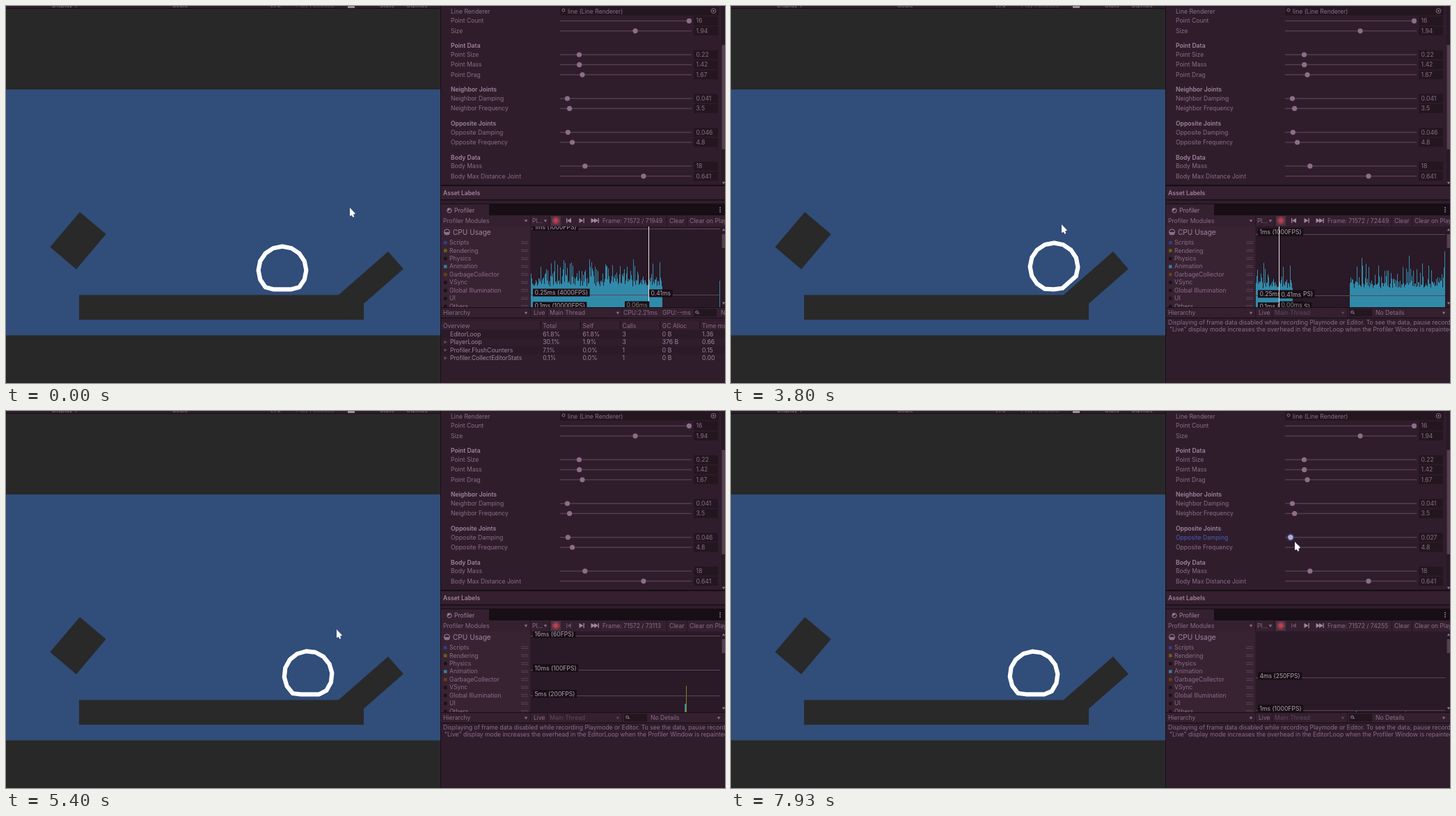
An HTML page with a canvas for the animation above (8000 ms loop, 1033 by 542 pixels).

```html
<!DOCTYPE html>
<html lang="en">
<head>
<meta charset="utf-8">
<title>Soft body editor</title>
<style>
html, body { margin: 0; width: 100%; height: 100%; overflow: hidden; background: #282828; }
canvas { display: block; }
</style>
</head>
<body>
<canvas id="stage" width="1033" height="542"></canvas>
<script>
const ctx = document.getElementById('stage').getContext('2d');
const LOOP = 8000, RESUME = 2270, LAUNCH = 4200, LAND = 4880, FOCUS = 7400;
const PANEL = '#2f1d2c', BAR = '#34202f', DARK = '#24161f', EDGE = '#180e15';
const TEXT = '#8d6d8a', BRIGHT = '#a184a0', DIM = '#5f485b', TEAL = '#318aa9';
const CHART = { left: 754, right: 1026, top: 317, bottom: 433, zero: 446, perFrame: 0.272 };
const MARKED = 71572, PAUSED = 71949, SPIKE = 72935;

const clamp01 = u => Math.min(Math.max(u, 0), 1);
const smooth = u => (u = clamp01(u), u * u * (3 - 2 * u));
function hash(n) {
  const s = Math.sin(n * 12.9898) * 43758.5453;
  return s - Math.floor(s);
}

// Motion
function frameCount(t) {
  const keys = [[2200, PAUSED], [2870, 72232], [3800, 72449], [4800, 72872], [6330, 73486], [7930, 74255]];
  return Math.round(keys.slice(1).reduce((n, [end, count], i) => {
    const [start, before] = keys[i];
    return n + (count - before) * clamp01((t - start) / (end - start));
  }, PAUSED));
}
function cursorAt(t) {
  const moves = [[1000, 1130, 473, 307], [1400, 1670, 362, -20], [2300, 2600, 475, 314],
    [5700, 6200, 795, 233], [6530, 6900, 808, 180], [7730, 7930, 810, 188]];
  return moves.reduce(([x, y], [start, end, toX, toY]) => {
    const u = smooth((t - start) / (end - start));
    return [x + (toX - x) * u, y + (toY - y) * u];
  }, [494, 290]);
}
function blobAt(t) {
  if (t < LAUNCH) {
    const s = Math.min(Math.max(t - RESUME, 0) / 1000, 1.6);
    const x = 397 + 18.4 * s + 16.6 * s * s;
    return [x, 380 - 5 * smooth((x - 450) / 14)];
  }
  const s = (t - LAUNCH) / 1000, u = (t - LAND) / 1000;
  const x = 435 + 34 * Math.exp(-2.43 * s) * Math.cos(3.5 * s);
  const y = u < 0 ? 336 + 340 * (u + 0.34) ** 2 : 380 - 5 * Math.exp(-4 * u) * Math.cos(14 * u);
  return [x, y];
}
function chartScale(t, frame) {
  if (frame < SPIKE) return 126 - 0.0083 * Math.max(0, t - 2870);
  return frame < SPIKE + 1000 ? 7.38 : 15.67;
}

// Drawing helpers
function rect(x, y, w, h, color) {
  ctx.fillStyle = color;
  ctx.fillRect(x, y, w, h);
}
function path(points) {
  ctx.beginPath();
  points.forEach(p => ctx.lineTo(...p));
  ctx.closePath();
}
function poly(points, color) {
  path(points);
  ctx.fillStyle = color;
  ctx.fill();
}
function tilted(x, y, w, h, degrees, color) {
  ctx.save();
  ctx.translate(x, y);
  ctx.rotate(degrees * Math.PI / 180);
  rect(-w / 2, -h / 2, w, h, color);
  ctx.restore();
}
function disc(x, y, r, color) {
  ctx.beginPath();
  ctx.arc(x, y, r, 0, 7);
  ctx.fillStyle = color;
  ctx.fill();
}
function ring(x, y, r, color) {
  ctx.beginPath();
  ctx.arc(x, y, r, 0, 7);
  ctx.strokeStyle = color;
  ctx.lineWidth = 1;
  ctx.stroke();
}
function text(s, x, y, color = TEXT, weight = 400, size = 8.6) {
  ctx.font = `${weight} ${size}px Inter, sans-serif`;
  ctx.fillStyle = color;
  ctx.fillText(s, x, y + size * 0.36);
}
const bold = (s, x, y) => text(s, x, y, BRIGHT, 600);
const triangle = (x, y, r, angle, color = TEXT) =>
  poly([0, 2.1, 4.2].map(a => [x + r * Math.cos(a + angle), y + r * Math.sin(a + angle)]), color);
const arrow = (x, y, color) => triangle(x, y, 2.6, Math.PI / 2, color);
function clipped(x, y, w, h, draw) {
  ctx.save();
  ctx.beginPath();
  ctx.rect(x, y, w, h);
  ctx.clip();
  draw();
  ctx.restore();
}

function drawBlob(t) {
  const [x, y] = blobAt(t), floor = 407.3, reach = 9;
  const slope = -41.2 * Math.PI / 180, nx = Math.sin(slope), ny = -Math.cos(slope);
  path(Array.from({ length: 16 }, (_, i) => {
    const a = (x - 397) / 34 + i * Math.PI / 8;
    const px = x + 34.4 * Math.cos(a), py = Math.min(y + 34.4 * Math.sin(a), floor);
    const push = Math.max(0, reach - (px - 478) * nx - (py - 416) * ny);
    return [px + nx * push, py + ny * push];
  }));
  ctx.strokeStyle = '#fff';
  ctx.lineWidth = 6.2;
  ctx.lineJoin = 'round';
  ctx.stroke();
}

function drawGame(t) {
  rect(0, 0, 624, 542, '#282828');
  rect(0, 0, 624, 3, PANEL);
  rect(0, 3, 624, 1, EDGE);
  clipped(0, 0, 624, 3, () => {
    text('Display 1', 66, -1.5);
    text('Scale', 239, -1.5);
    text('1.7x', 379, -1.5);
    text('Play Focused', 417, -1.5, DIM);
    rect(491, 0, 10, 3, BRIGHT);
    text('Stats', 537, -1.5);
    text('Gizmos', 575, -1.5);
  });
  rect(0, 120, 624, 353.5, '#314d79');
  tilted(103.5, 337.3, 49.3, 66, 40.3, '#292929');
  rect(105, 415.5, 409, 35.5, '#292929');
  tilted(518.6, 401.7, 110, 33.3, -41.2, '#292929');
  drawBlob(t);
}

function slider(label, y, value, max, focused) {
  const knob = 799 + 182.5 * value / max;
  text(label, 639, y, focused ? '#4c5cba' : TEXT);
  rect(796, y - 0.7, 189, 1.4, '#56404f');
  if (focused) disc(knob, y, 5.5, '#2d3f82');
  disc(knob, y, 3.6, focused ? '#c0adbd' : TEXT);
  rect(988, y - 6.5, 35, 13, DARK);
  text(value, 991.5, y);
}

function drawInspector(t) {
  rect(624, 0, 409, 542, PANEL);
  text('Line Renderer', 639, 7.5);
  rect(796, 1, 228, 12.5, DARK);
  ring(801, 6, 2, TEXT);
  text('line (Line Renderer)', 807, 7.5);
  ring(1016.5, 7, 3.4, TEXT);
  disc(1016.5, 7, 1.3, TEXT);
  const damping = (0.046 - 0.019 * clamp01((t - FOCUS) / 330)).toFixed(3);
  const groups = {
    '': [['Point Count', '16', 16], ['Size', '1.94', 3.37]],
    'Point Data': [['Point Size', '0.22', 1.64], ['Point Mass', '1.42', 10.5], ['Point Drag', '1.67', 10.5]],
    'Neighbor Joints': [['Neighbor Damping', '0.041', 1], ['Neighbor Frequency', '3.5', 60]],
    'Opposite Joints': [['Opposite Damping', damping, 1, t >= FOCUS], ['Opposite Frequency', '4.8', 60]],
    'Body Data': [['Body Mass', '18', 100], ['Body Max Distance Joint', '0.641', 1]]
  };
  let y = -12.8;
  for (const [title, rows] of Object.entries(groups)) {
    bold(title, 639, y += 21.5);
    rows.forEach(([label, value, max, focused], i) => {
      y += i ? 14.4 : 12.7;
      slider(label, y, value, max, focused);
    });
  }
  rect(1028, 0, 5, 258, '#291a25');
  rect(1028.5, 56, 4.5, 150, '#553f50');
  arrow(1031, 254);
  rect(625, 257, 408, 2, EDGE);
  rect(625, 259, 408, 19, BAR);
  bold('Asset Labels', 628, 268.5);
  rect(625, 278, 408, 1.5, EDGE);
}

function chartLabel(s, x, y, color = '#b6a6b4') {
  ctx.font = '400 8.6px Inter, sans-serif';
  rect(x, y - 5.5, ctx.measureText(s).width + 5, 11, EDGE);
  text(s, x + 2.5, y, color);
}

function drawChart(t, frame) {
  const { left, right, top, bottom, zero, perFrame } = CHART;
  const width = right - left, height = bottom - top, scale = chartScale(t, frame);
  const toX = n => Math.floor(right - (frame - n) * perFrame);
  const toY = ms => zero - ms * scale;
  rect(left, top, 279, height, '#2a1926');
  clipped(left, top, width, height, () => {
    for (let x = left; x < right; x++) {
      const n = frame - (right - 1 - x) / perFrame, k = Math.round(n * perFrame);
      if (n > PAUSED - 305 && n < PAUSED) continue;
      const tall = hash(k + 7000) > 0.982 ? 0.35 : 0;
      const ms = 0.34 + 0.07 * hash(k + 300) + 0.26 * hash(k) ** 3 + tall;
      rect(x, toY(ms), 1, ms * scale, TEAL);
    }
    if (frame >= SPIKE) {
      const x = toX(SPIKE);
      rect(x - 2, toY(3.4), 3, height, TEAL);
      rect(x - 1, toY(2.4), 2, height, '#8a8424');
      rect(x, toY(6.9), 1, height, '#8a8424');
    }
    const rates = scale > 50 ? [1000, 4000, 10000] : scale > 10 ? [250, 1000] : [60, 100, 200];
    for (const fps of rates) {
      const y = toY(1000 / fps);
      rect(left, Math.round(y), width, 1, '#5c4857');
      chartLabel(`${Math.floor(100000 / fps) / 100 | 0 || 1000 / fps}ms (${fps}FPS)`, 757, y - 2.5);
    }
    const x = toX(MARKED);
    if (x > left) {
      const low = x < 800;
      rect(x, top, 1, height, '#e6e0e4');
      chartLabel('0.41ms', x + 1, toY(0.25) - 1.5);
      chartLabel(low ? '0.00ms' : '0.06ms', low ? x + 1 : x - 34, 430, '#82877a');
    }
  });
  rect(1028.5, 328, 4.5, 20, '#553f50');
  triangle(1031, 322, 2.6, -Math.PI / 2);
  arrow(1031, 427);
}

function drawModules() {
  rect(625, 317, 128, 116, '#382333');
  ring(633.5, 325, 4, BRIGHT);
  rect(630, 325, 7, 4, TEXT);
  text('CPU Usage', 642, 325, BRIGHT, 400, 10.1);
  const names = ['Scripts', 'Rendering', 'Physics', 'Animation', 'GarbageCollector', 'VSync',
    'Global Illumination', 'UI', 'Others'];
  const colors = { Scripts: '#343f85', Rendering: '#67601c', Animation: '#34809a', GarbageCollector: '#654019' };
  clipped(625, 317, 128, 116, () => names.forEach((name, i) => {
    const y = 340 + i * 11.45;
    rect(629, y - 2, 4.5, 4.5, colors[name] || '#1d1118');
    text(name, 637, y);
    for (const d of [-1.5, 1]) rect(740, y + d, 10, 0.8, DIM);
  }));
}

function searchBox(x) {
  rect(x, 435.5, 33, 11, DARK);
  ring(x + 4.5, 440, 1.8, BRIGHT);
  rect(x + 6, 441.5, 2, 1, BRIGHT);
}

function drawTable() {
  text('CPU:2.21ms', 887, 441);
  text('GPU:--ms', 943, 441);
  searchBox(988);
  text('No Details', 1027, 441);
  rect(625, 453, 408, 12, BAR);
  const rows = [
    'Overview|Total|Self|Calls|GC Alloc|Time ms',
    'EditorLoop|61.8%|61.8%|3|0 B|1.36',
    'PlayerLoop|30.1%|1.9%|3|376 B|0.66',
    'Profiler.FlushCounters|7.1%|0.0%|1|0 B|0.15',
    'Profiler.CollectEditorStats|0.1%|0.0%|1|0 B|0.00'];
  rows.forEach((row, i) => {
    const y = i ? 460.2 + i * 11.5 : 459.5;
    if (i % 2) rect(625, y - 5.7, 408, 11.5, '#2b1a28');
    row.split('|').forEach((s, j) => {
      const x = j ? 714 + 57.2 * j : i ? 638 : 628;
      text(s, x, y, i ? BRIGHT : TEXT);
      if (j && !i) rect(x - 3.5, 453, 1, 12, EDGE);
    });
    if (i > 1) triangle(631, y, 3, 0, DIM);
  });
}

function drawMessage() {
  searchBox(888);
  text('No Details', 926, 441);
  arrow(1024, 441);
  text('Displaying of frame data disabled while recording Playmode or Editor. To see the data, pause recording.', 628, 455);
  text('"Live" display mode increases the overhead in the EditorLoop when the Profiler Window is repainted.', 630, 465);
}

function drawProfiler(t) {
  const live = t >= RESUME, frame = frameCount(t);
  rect(625, 284, 408, 17, EDGE);
  rect(625, 285, 69, 16, BAR);
  ring(637, 294, 3.2, BRIGHT);
  triangle(636, 292.5, 2.6, 0, BRIGHT);
  text('Profiler', 644, 293.5, BRIGHT);
  for (const y of [290, 293, 296]) disc(1026, y, 0.9, BRIGHT);

  const y = 308.5, back = frame - MARKED > 1000 ? DIM : BRIGHT;
  rect(625, 301, 408, 16, BAR);
  text('Profiler Modules', 628, y);
  arrow(747, y);
  text('Pl...', 756, y);
  arrow(775, y);
  rect(783, 302, 14, 14, '#4c3444');
  ring(790, y, 4.6, '#c03e50');
  disc(790, y, 3.2, '#c03e50');
  rect(805, y - 3.5, 1.3, 7, back);
  triangle(810, y, 4, Math.PI, back);
  triangle(825.5, y, 4, 0, BRIGHT);
  rect(829.5, y - 3.5, 1.3, 7, BRIGHT);
  triangle(842.5, y, 4, 0, BRIGHT);
  triangle(847, y, 4, 0, BRIGHT);
  rect(850.5, y - 3.5, 1.3, 7, BRIGHT);
  text(`Frame: ${MARKED} / ${frame}`, 857, y);
  text('Clear', 953, y);
  text('Clear on Play', 982, y);
  for (const x of [753, 780, 949, 978]) rect(x, 301, 1, 16, DARK);
  drawModules();
  drawChart(t, frame);

  const thread = live ? DIM : TEXT;
  rect(625, 433, 408, 1, EDGE);
  rect(625, 434, 408, 14, BAR);
  text('Hierarchy', 628, 441);
  arrow(747, 441);
  text('Live', 758, 441);
  text('Main Thread', 781, 441, thread);
  arrow(879, 441, thread);
  for (const x of [753, 777, 885]) rect(x, 434, 1, 14, DARK);
  rect(625, 448, 408, 1, EDGE);
  if (live) drawMessage(); else drawTable();
}

function drawCursor(t) {
  const [x, y] = cursorAt(t);
  poly([[x, y], [x, y + 12], [x + 8, y + 8.6]], '#fff');
  tilted(x + 4, y + 10.5, 2.2, 6, -26, '#fff');
}

function draw() {
  const step = Math.floor((performance.now() % LOOP) * 0.015 + 0.06);
  const t = Math.round(step * 20 / 3) * 10 % LOOP;
  drawGame(t);
  drawInspector(t);
  drawProfiler(t);
  rect(624, 0, 1, 542, EDGE);
  drawCursor(t);
  requestAnimationFrame(draw);
}
draw();
</script>
</body>
</html>
```
